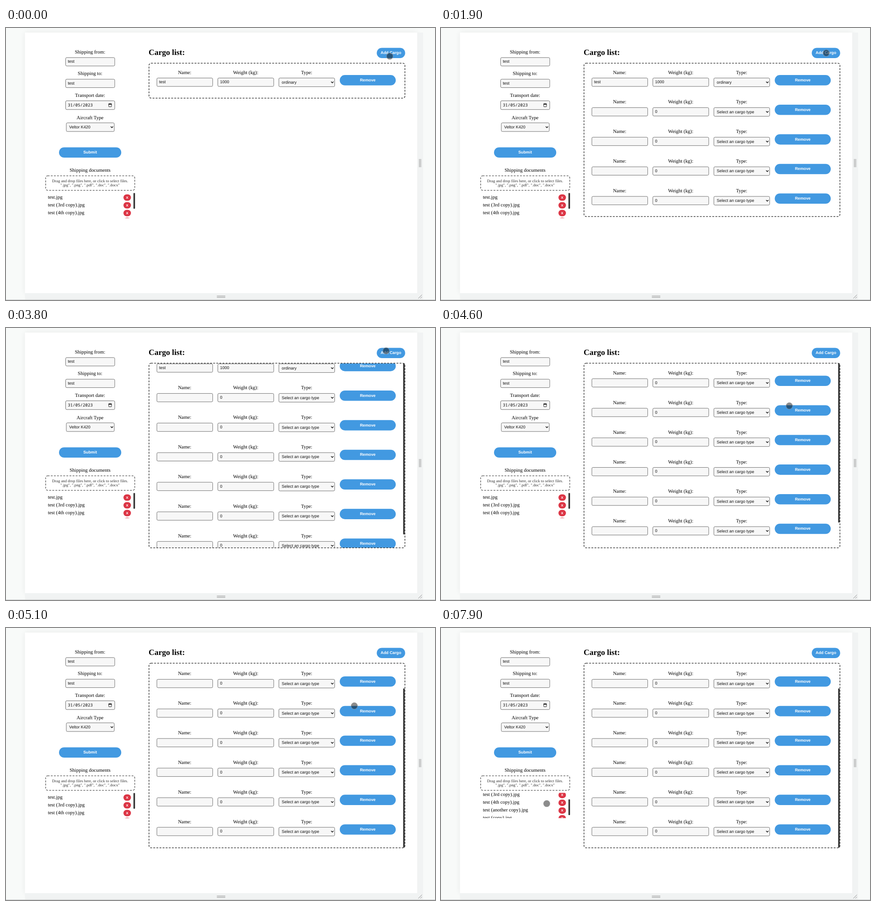
An HTML page with a canvas that plays this animation: 939 by 596 pixels, repeating every 8000 ms.

```html
<!DOCTYPE html>
<html lang="en">
<head>
<meta charset="utf-8">
<title>Cargo form</title>
<style>
html, body { margin: 0; width: 100%; height: 100%; overflow: hidden; background: #f8faf9; }
canvas { display: block; }
</style>
</head>
<body>
<canvas id="stage" width="939" height="596"></canvas>
<script>
const ctx = document.getElementById('stage').getContext('2d');
ctx.textRendering = 'geometricPrecision';
const LOOP = 8000, STEP = 100, PITCH = 64.85;
const BLUE = '#4299e1', RED = '#dc3545';
const SERIF = '"Liberation Serif", serif', SANS = '"Liberation Sans", sans-serif';
const LABEL = '10.95px ' + SERIF, FIELD = '9px ' + SANS, BOLD = 'bold 8.8px ' + SANS;

const FILES = ['test.jpg', 'test (3rd copy).jpg', 'test (4th copy).jpg',
  'test (another copy).jpg', 'test (copy).jpg'];

// [time of tap, time the tap highlight lasts]
const TAPS = [[500, 100], [800, 300], [1300, 200], [1700, 200], [2200, 200], [2700, 200], [4100, 200]];

// [time, value...]
const POINTER = [[0, 840, 61.8], [100, 843.2, 54.8], [3000, 843.2, 54.8], [3300, 811, 114], [3400, 811, 114],
  [3800, 832, 50], [4200, 832, 50], [4600, 762.4, 170.6], [5800, 762.4, 170.6], [6500, 234.4, 380.8],
  [6700, 233, 383], [7800, 233, 383], [7900, 231.4, 384.8]];
const CARGO_SCROLL = [[4900, 0], [5100, 63.4]];
const FILE_SCROLL = [[6700, 0], [7000, 33], [7800, 33], [7900, 22.6]];

function valueAt(keys, t) {
  const next = keys.findIndex(k => k[0] > t);
  if (next === 0) return keys[0].slice(1);
  if (next < 0) return keys[keys.length - 1].slice(1);
  const a = keys[next - 1], b = keys[next];
  const u = (t - a[0]) / (b[0] - a[0]), e = u * u * (3 - 2 * u);
  return a.slice(1).map((v, i) => v + (b[i + 1] - v) * e);
}

function text(str, x, y, font = LABEL, color = '#000', align = 'center') {
  ctx.font = font;
  ctx.fillStyle = color;
  ctx.textAlign = align;
  ctx.textBaseline = 'middle';
  ctx.fillText(str, x, y);
}

function box(x, y, w, h, r, fill, stroke, width = 1) {
  ctx.beginPath();
  ctx.roundRect(x, y, w, h, r);
  if (fill) { ctx.fillStyle = fill; ctx.fill(); }
  if (stroke) { ctx.strokeStyle = stroke; ctx.lineWidth = width; ctx.stroke(); }
}

function line(color, width, ...points) {
  ctx.beginPath();
  points.forEach(([x, y]) => ctx.lineTo(x, y));
  ctx.strokeStyle = color;
  ctx.lineWidth = width;
  ctx.stroke();
}

function dashed(x, y, w, h, color) {
  ctx.setLineDash([4.1, 2.7]);
  box(x, y, w, h, 4.5, null, color, 1.3);
  ctx.setLineDash([]);
}

function clipped(x, y, w, h, draw) {
  ctx.save();
  ctx.beginPath();
  ctx.rect(x, y, w, h);
  ctx.clip();
  draw();
  ctx.restore();
}

function button(label, x, y, w) {
  box(x, y, w, 22.6, 11.3, BLUE);
  text(label, x + w / 2, y + 11.3, BOLD, '#fff');
}

function field(value, x, y, w, h = 18.4, font = FIELD) {
  box(x, y, w, h, 2.5, '#f7f7f7', '#707070');
  text(value, x + 4.8, y + h / 2, font, '#111', 'left');
}

function select(value, x, y, w) {
  box(x, y, w, 19, 2.5, '#f7f7f7', '#707070');
  text(value, x + 6.2, y + 9.8, FIELD, '#111', 'left');
  const cx = x + w - 5.2, cy = y + 9.3;
  line('#111', 1.4, [cx - 2.6, cy - 1.4], [cx, cy + 1.3], [cx + 2.6, cy - 1.4]);
}

function drawFrame() {
  ctx.fillStyle = '#f8faf9';
  ctx.fillRect(0, 0, 939, 596);
  ctx.save();
  ctx.shadowColor = 'rgba(0,0,0,.07)';
  ctx.shadowBlur = 12;
  box(41.5, 10, 858.5, 571, 0, '#fff');
  ctx.restore();
  ctx.fillStyle = '#f1f3f3';
  ctx.fillRect(900, 10, 13, 586);
  ctx.fillRect(41.5, 581, 871.5, 15);
  ctx.fillStyle = '#c9cbcb';
  ctx.fillRect(0, 595, 939, 1);
  const grip = '#8a8a8a';
  for (const d of [0, 3]) {
    line(grip, 1, [904.8 + d, 287], [904.8 + d, 305]);
    line(grip, 1, [461.5, 587.3 + d], [480, 587.3 + d]);
  }
  line(grip, 1, [902.5, 592.5], [910.5, 584.5]);
  line(grip, 1, [907, 592.5], [910.5, 589]);
}

function drawForm() {
  text('Shipping from:', 184, 53.3);
  field('test', 130.5, 64.8, 107.5);
  text('Shipping to:', 184, 100.6);
  field('test', 130.5, 112.2, 107.5);
  text('Transport date:', 184, 148);
  field('31/05/2023', 130.5, 159.5, 107.5, 19.2, '9.1px "Noto Sans Mono", monospace');
  box(224.9, 166.2, 6, 6.4, .6, null, '#111', .9);
  ctx.fillStyle = '#111';
  ctx.fillRect(224.5, 165.6, 6.8, 2.2);
  text('Aircraft Type', 184, 196.8);
  select('Veltor K420', 132, 207.8, 105);
  button('Submit', 116, 261.4, 136.3);
}

function drawFiles(scroll) {
  text('Shipping documents', 184, 312.2);
  dashed(86.8, 323.8, 195, 31.8, '#555');
  const hint = '8.75px ' + SERIF;
  text('Drag and drop files here, or click to select files.', 184, 335.3, hint, '#333');
  text('".jpg", ".png", ".pdf", ".doc", ".docx"', 184, 344.9, hint, '#333');
  clipped(86, 361.3, 197, 55.2, () => {
    FILES.forEach((name, i) => {
      const y = 371.4 + i * 17 - scroll;
      text(name, 91.7, y - .2, LABEL, '#000', 'left');
      box(257.1, y - 6.9, 16.4, 14, 7, RED);
      text('x', 265.3, y, BOLD, '#fff');
    });
    box(279, 361.5 + scroll * .62, 3.4, 34.4, 1, '#333');
  });
}

function drawCargoRow(y, name, weight, type) {
  text('Name:', 391, y - 16.3);
  text('Weight (kg):', 524.6, y - 16.3);
  text('Type:', 658, y - 16.3);
  field(name, 330.2, y - 4.4, 122.2);
  field(weight, 463.6, y - 4.4, 122.4);
  select(type, 597.2, y - 4.4, 122.2);
  button('Remove', 730.5, y - 10.9, 122.6);
}

function drawCargo(count, scroll, glow) {
  text('Cargo list:', 312.3, 54.8, 'bold 17.5px ' + SERIF, '#000', 'left');
  button('Add Cargo', 811.5, 43.4, 62.2);
  if (glow) {
    ctx.fillStyle = `rgba(51,181,229,${.4 * glow})`;
    ctx.fillRect(811.5, 43.2, 62.2, 23);
  }
  const height = Math.min(76.6 + (count - 1) * PITCH, 404.6);
  // Rows are centred, so half of the overflow is cut off at the top.
  const hidden = Math.max(0, (count - 6) * PITCH / 2 - 1.4);
  clipped(313, 77.4, 560, height - .6, () => {
    for (let i = 0; i < count; i++) {
      const y = 114 + i * PITCH - hidden - scroll;
      if (i) drawCargoRow(y, '', '0', 'Select an cargo type');
      else drawCargoRow(y, 'test', '1000', 'ordinary');
    }
    if (hidden) {
      const view = 403.4, ratio = view / (view + hidden);
      box(869.3, 77.6 + scroll * ratio, 3.4, view * ratio, 1, '#333');
    }
  });
  dashed(313, 77.1, 560.2, height, '#222');
}

function drawPointer(x, y) {
  ctx.beginPath();
  ctx.arc(x, y, 7, 0, 2 * Math.PI);
  ctx.fillStyle = 'rgba(0,0,0,.45)';
  ctx.fill();
  ctx.strokeStyle = 'rgba(140,140,140,.6)';
  ctx.lineWidth = 1.1;
  ctx.stroke();
}

const start = performance.now();

function render(now) {
  const t = Math.floor(Math.max(0, now - start) % LOOP / STEP) * STEP;
  const taps = TAPS.filter(([at]) => at <= t);
  const [at, span] = taps[taps.length - 1] || [-LOOP, 1];
  drawFrame();
  drawForm();
  drawFiles(valueAt(FILE_SCROLL, t)[0]);
  drawCargo(1 + taps.length, valueAt(CARGO_SCROLL, t)[0], Math.max(0, 1 - (t - at) / span));
  drawPointer(...valueAt(POINTER, t));
  requestAnimationFrame(render);
}
render(start);
</script>
</body>
</html>
```
